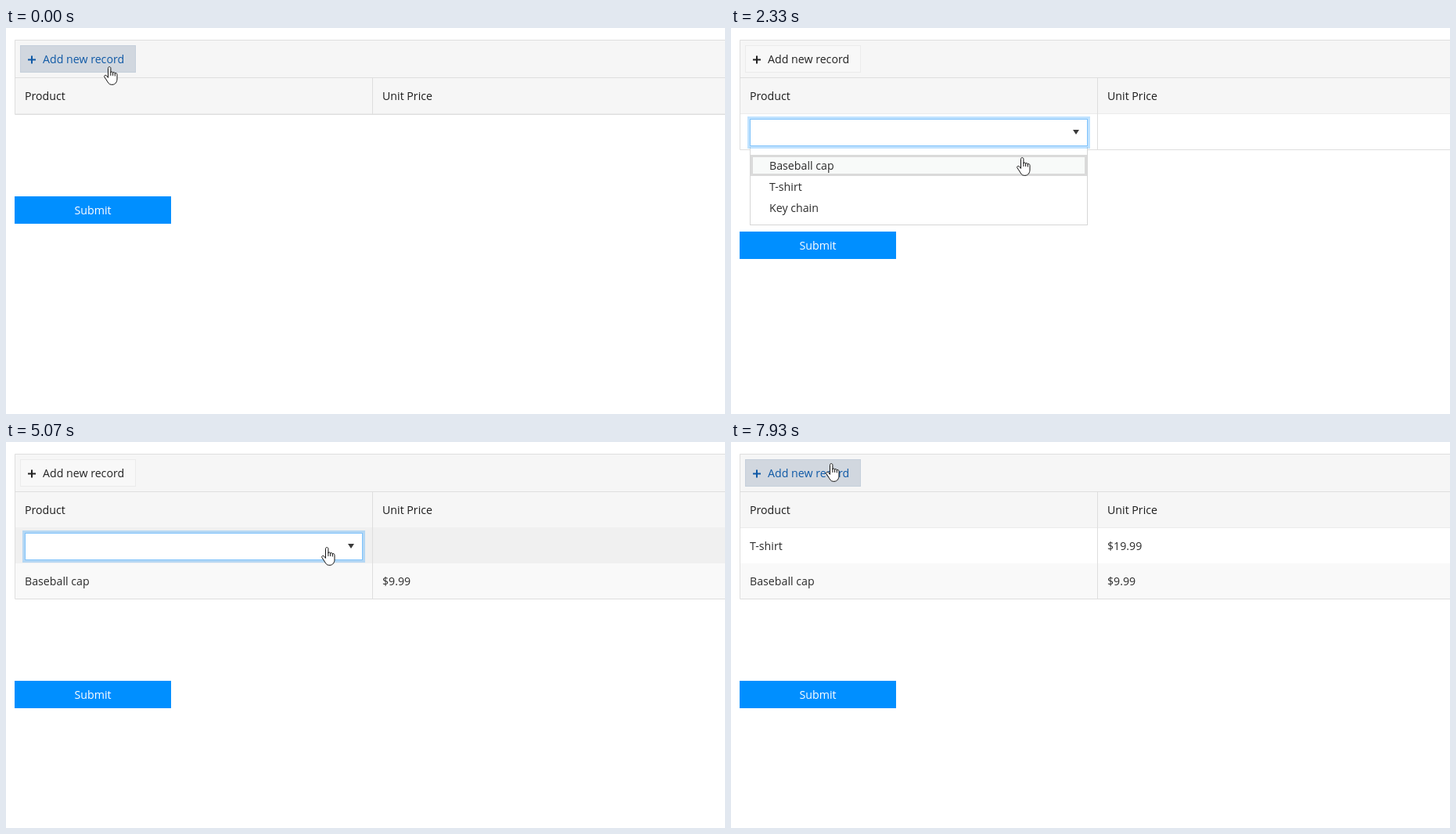
Write an HTML page that moves like this. It is 919x493 px and loops after 8000 ms.

```html
<!DOCTYPE html>
<html lang="en">
<head>
<meta charset="utf-8">
<title>Editable product grid</title>
<style>
  html, body { margin: 0; width: 100%; height: 100%; overflow: hidden; background: #fff; }
  svg { display: block; }
  text { font: 14.2px "Open Sans", "Noto Sans", sans-serif; fill: #2b2b2b; }
  .head text { fill: #1c1c1c; }
  .line { stroke: #dedede; fill: none; }
  .hidden { display: none; }
  #add rect { fill: #f8f8f8; stroke: #ebebeb; }
  #add text { fill: #222; }
  #add path { stroke: #222; stroke-width: 2; }
  #add.hover rect { fill: #d1d7df; stroke: #c5cfdb; }
  #add.hover text { fill: #0f59a6; }
  #add.hover path { stroke: #0f59a6; }
  #add.down rect { fill: #cad1d9; }
  #add .ring { display: none; }
  #add.down .ring { display: inline; fill: none; stroke: #bfdcf6; stroke-width: 2; }
  #field { fill: #fff; stroke: #c8c8c8; }
  .focus #field { stroke: #7ec2fb; }
  #glow { display: none; fill: none; stroke: #008cff; stroke-opacity: .25; stroke-width: 3; }
  .focus #glow { display: inline; }
</style>
</head>
<body>
<svg width="919" height="493" viewBox="0 0 919 493">
  <defs><clipPath id="reveal"><rect id="window" x="20" y="152" width="440" height="98"/></clipPath></defs>

  <rect x="11" y="15" width="920" height="95" fill="#f6f6f6"/>
  <rect id="row0" x="11" y="109" width="920" height="46"/>
  <rect id="row1" x="11" y="155" width="920" height="45"/>
  <path id="headLine" d="M11 109.5H919" stroke="#ebebeb"/>
  <path class="line" d="M11 63.5H919"/>
  <path id="frame" class="line"/>

  <g id="add">
    <rect x="18.5" y="22.5" width="147" height="34"/>
    <rect class="ring" x="17" y="21" width="150" height="37"/>
    <path d="M28 40.5H38M33 35.5V45.5"/>
    <text x="47" y="45">Add new record</text>
  </g>
  <g class="head">
    <text x="24" y="92">Product</text>
    <text x="481" y="92">Unit Price</text>
  </g>
  <text id="name0" x="24" y="138"></text>
  <text id="price0" x="481" y="138"></text>
  <text id="name1" x="24" y="183"></text>
  <text id="price1" x="481" y="183"></text>

  <g id="submit">
    <rect x="11" width="200" height="35" fill="#008fff"/>
    <text x="111" y="23" text-anchor="middle" style="fill:#fff">Submit</text>
  </g>

  <g id="popup" clip-path="url(#reveal)">
    <g id="list">
      <rect x="24.5" y="151.5" width="431" height="100" fill="#fff" stroke="#d6d6d6"/>
      <rect id="over" x="25" width="430" height="27" fill="#f8faf9"/>
      <rect x="26.5" y="163.5" width="427" height="24" fill="none" stroke="#dadada" stroke-width="3"/>
      <text x="49" y="181">Baseball cap</text>
      <text x="49" y="208">T-shirt</text>
      <text x="49" y="235">Key chain</text>
    </g>
  </g>

  <g id="editor">
    <rect id="glow" x="22.5" y="114.5" width="435" height="38"/>
    <rect id="field" x="24.5" y="116.5" width="431" height="34"/>
    <path d="M437 130H445L441 136Z" fill="#3a3a3a"/>
  </g>

  <g id="hand" stroke="#111" stroke-linejoin="round" stroke-linecap="round">
    <path fill="#fff" d="M5.5 14V2.4C5.5 0 8.9 0 8.9 2.4V8C9 6.3 11.6 6.5 11.6 8.5C11.8 6.9 14.3 7.2 14.3 9.2C14.5 8 17 8.2 17 10.6V16C17 19.5 15 23.3 11 23.3H9.6C6.6 23.3 5.4 20.6 3.8 18L.9 13.7C-.2 11.6 2.4 10.5 3.6 11.9Z"/>
    <path fill="none" d="M8.9 8V11.5M11.6 8.5V11.5M14.3 9.2V12"/>
  </g>
</svg>
<script>
const LOOP = 8000, TICK = 1000 / 15;
const $ = id => document.getElementById(id);
const set = (id, name, value) => $(id).setAttribute(name, value);
const show = (id, on) => $(id).classList.toggle("hidden", !on);

// Pointer path: tick, x, y (eased between stops)
const path = [
  [0, 125, 49], [3, 125, 49], [15, 345, 134], [20, 429, 139], [21, 429, 139],
  [25, 434, 139], [30, 434, 139], [35, 365, 165], [39, 355, 174], [40, 355, 174],
  [41, 355, 175], [48, 355, 175], [51, 363, 182], [54, 363, 182], [65, 140, 34],
  [67, 140, 34], [73, 397, 133], [75, 397, 133], [76, 403, 134], [82, 440, 135],
  [89, 440, 135], [98, 383, 198], [99, 384, 201], [109, 384, 201], [119, 121, 27]
];
const cap = ["Baseball cap", "$9.99"], shirt = ["T-shirt", "$19.99"], blank = ["", ""];

// Ticks at which the table and the list change
const ADD1 = 3, OPEN1 = 28, PICK1 = 43, PRESS = 65, ADD2 = 67, OPEN2 = 86, PICK2 = 105;
const within = (k, a, b) => k >= a && k < b;

function pointer(k) {
  const i = path.findIndex(p => p[0] >= k);
  if (i <= 0) return path[0].slice(1);
  const [t0, x0, y0] = path[i - 1], [t1, x1, y1] = path[i];
  const u = (k - t0) / (t1 - t0), e = u * u * (3 - 2 * u);
  return [Math.round(x0 + (x1 - x0) * e), Math.round(y0 + (y1 - y0) * e)];
}

function rowsAt(k) {
  if (k < ADD1) return [];
  if (k < PICK1) return [blank];
  if (k < ADD2) return [cap];
  return k < PICK2 ? [blank, cap] : [shirt, cap];
}

function draw(k) {
  const [x, y] = pointer(k), tipX = x + 7, tipY = y + 1;
  const rows = rowsAt(k), n = rows.length;
  const bottom = n ? 110.5 + 45 * n : 110.5;
  const edit1 = within(k, ADD1, PICK1), edit2 = within(k, ADD2, PICK2);
  const since = k - (edit2 ? OPEN2 : OPEN1);
  const open = (edit1 || edit2) && since >= 0;

  for (const i of [0, 1]) {
    const top = 110 + 45 * i, row = rows[i] || blank;
    const hover = within(tipY, top, top + 45) && !(open && i);
    show("row" + i, i < n);
    set("row" + i, "fill", hover ? "#f0f0f0" : i ? "#f9f9f9" : "#fff");
    $("name" + i).textContent = row[0];
    $("price" + i).textContent = row[1];
  }
  show("headLine", !within(tipY, 110, 155));
  set("frame", "d", `M919 15.5H11.5V${bottom}H919M468.5 64V${bottom}`);
  set("submit", "transform", `translate(0 ${215 + 45 * n})`);

  const inAdd = within(tipX, 18, 166) && within(tipY, 22, 57);
  $("add").classList.toggle("hover", inAdd);
  $("add").classList.toggle("down", within(k, PRESS, ADD2));

  show("editor", edit1 || edit2);
  $("editor").classList.toggle("focus", k > (edit2 ? ADD2 : ADD1));

  show("popup", open);
  if (open) {
    const left = 1 - Math.min(1, (since + 1) / 4);
    set("list", "transform", `translate(0 ${-100 * left * left})`);
    set("window", "height", since < 4 ? 98 : 100);
    const item = Math.floor((tipY - 162) / 27);
    show("over", within(item, 0, 3));
    set("over", "y", 162 + 27 * item);
  }
  set("hand", "transform", `translate(${x} ${y})`);
}

const start = performance.now();
let last = -1;
function loop() {
  const t = (performance.now() - start) % LOOP;
  const k = Math.min(119, Math.floor((t + 5) / TICK));
  if (k !== last) draw(last = k);
  requestAnimationFrame(loop);
}
loop();
</script>
</body>
</html>
```
